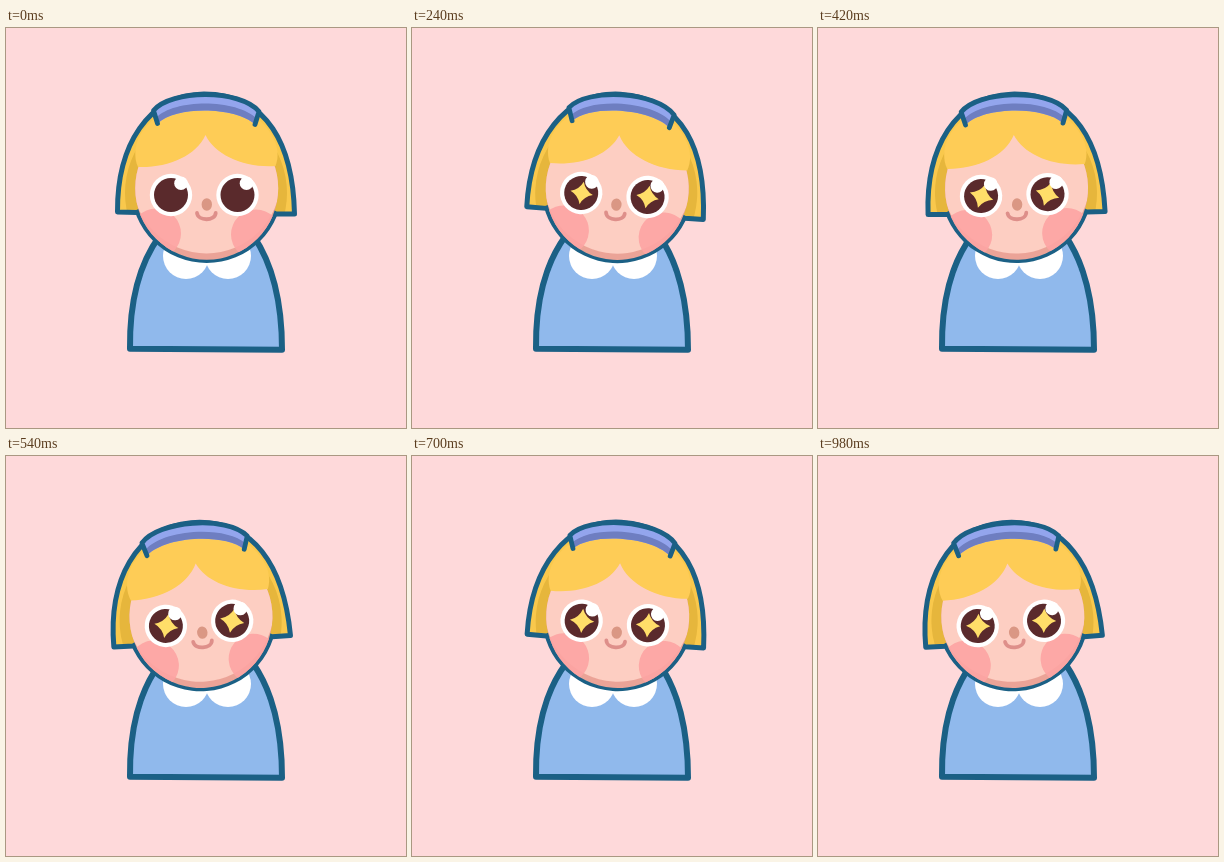
An HTML page that plays this animation: 400x400 px, repeating every 1000 ms.

```html
<!DOCTYPE html>
<html lang="en">
<head>
<meta charset="utf-8">
<title>Starry-eyed girl</title>
<style>
  html, body { margin: 0; width: 100%; height: 100%; overflow: hidden; background: #fed9da; }
  svg { display: block; width: 100%; height: 100%; }
  .line { stroke: #1b6085; stroke-linejoin: round; stroke-linecap: round; }
</style>
</head>
<body>
<svg viewBox="0 0 400 400">
  <defs>
    <path id="hairShape" d="M111.500 184C111 118 142 66.500 198 66C262 66 287 118 288.500 186L270 186L200 150L131 184.500Z"/>
    <clipPath id="hairClip"><use href="#hairShape"/></clipPath>
    <clipPath id="faceClip"><circle cx="200.700" cy="160.300" r="71.500"/></clipPath>
    <path id="star" fill="#ffde69" d="M0-12.200Q3.200-3.200 12.200 0Q3.200 3.200 0 12.200Q-3.200 3.200-12.200 0Q-3.200-3.200 0-12.200Z"/>
    <g id="eye">
      <circle r="21.200" fill="#fff"/>
      <circle r="17" fill="#5a2a2c"/>
    </g>
  </defs>

  <path class="line" fill="#90b9ec" stroke-width="6" d="M124 320.800C123.500 282 129.500 241 153.500 208H247.500C270 241 276 282 276 321.800Z"/>
  <g fill="#fff">
    <circle cx="180" cy="228" r="23"/>
    <circle cx="222" cy="228" r="23"/>
  </g>

  <g id="head">
    <ellipse cx="200.700" cy="160.200" rx="75.600" ry="74.800" fill="#1b6085"/>
    <use href="#hairShape" fill="#f9c84c"/>
    <g clip-path="url(#hairClip)">
      <ellipse cx="200" cy="165" rx="81" ry="85" fill="#e6b63c"/>
    </g>
    <use href="#hairShape" class="line" fill="none" stroke-width="5"/>

    <g clip-path="url(#faceClip)">
      <rect x="120" y="80" width="160" height="160" fill="#eba397"/>
      <circle cx="200.500" cy="151.500" r="74" fill="#fdcec2"/>
      <g fill="#fda5a3" fill-opacity=".9">
        <circle cx="150" cy="205.500" r="25"/>
        <circle cx="250" cy="206.500" r="25"/>
      </g>
    </g>
    <path fill="#fecc56" d="M132 139C162 140 190 128 199.500 107C209 127 238 140 269.500 138C277 120 264 98 247 88L200 74L153 88C135 98 124 120 132 139Z"/>

    <path fill="#93a5ed" d="M147.500 82.500C165 61.500 234 61 253 83.500L249 96.500C230 78.500 170 77.500 151.500 95.500Z"/>
    <path fill="#6e7ec1" d="M150 90C168 70.500 231 70.500 251 91L249 96.500C230 78.500 170 77.500 151.500 95.500Z"/>
    <path class="line" fill="none" stroke-width="4.800" d="M151.500 95.500L147.500 82.500C165 61.500 234 61 253 83.500L249 96.500"/>

    <use href="#eye" x="165" y="167"/>
    <use href="#eye" x="231.500" y="167"/>
    <use class="star" href="#star" data-x="165.500" data-y="167"/>
    <use class="star" href="#star" data-x="231.500" data-y="167"/>
    <g fill="#fff">
      <circle cx="175" cy="155.300" r="6.800"/>
      <circle cx="240.500" cy="155.300" r="6.800"/>
    </g>
    <ellipse cx="200.800" cy="176.500" rx="5.200" ry="6.200" fill="#da9784"/>
    <path fill="none" stroke="#de8f8a" stroke-width="3.800" stroke-linecap="round" d="M191 185C192 193.300 209 193.300 209.700 185"/>
  </g>
</svg>
<script>
  const LOOP = 1000;
  // [time in ms, value]
  const tilt = [[0, 0], [160, 3.2], [210, 3.7], [320, 1.8], [540, -4.4], [700, 3.8], [735, 4.1], [860, 0.8], [980, -4.5], [1000, -4.6]];
  const spin = [[0, 0], [160, 0], [320, 17], [440, 19], [540, 15], [700, 1], [860, 16], [980, 6], [1000, 5]];
  const grow = [[0, 0], [160, 0.7], [300, 1], [1000, 1]];

  const head = document.getElementById("head");
  const stars = document.querySelectorAll(".star");

  // Slope at a key: flat at turning points and ends
  function slope(keys, i) {
    const a = keys[i - 1], b = keys[i], c = keys[i + 1];
    if (!a || !c || (b[1] - a[1]) * (c[1] - b[1]) <= 0) return 0;
    return (c[1] - a[1]) / (c[0] - a[0]);
  }

  function sample(keys, t) {
    let i = 0;
    while (i < keys.length - 2 && t >= keys[i + 1][0]) i++;
    const [t0, v0] = keys[i], [t1, v1] = keys[i + 1];
    const d = t1 - t0, p = (t - t0) / d, q = 1 - p;
    return v0 * q * q * (1 + 2 * p) + v1 * p * p * (3 - 2 * p)
      + d * p * q * (slope(keys, i) * q - slope(keys, i + 1) * p);
  }

  function draw(now) {
    const t = now % LOOP;
    head.setAttribute("transform", `rotate(${sample(tilt, t)} 200.5 235)`);
    const turn = sample(spin, t), size = sample(grow, t);
    for (const s of stars) {
      s.setAttribute("transform", `translate(${s.dataset.x} ${s.dataset.y}) rotate(${turn}) scale(${size})`);
    }
  }

  const start = performance.now();
  function tick() {
    draw(performance.now() - start);
    requestAnimationFrame(tick);
  }
  tick();
</script>
</body>
</html>
```
